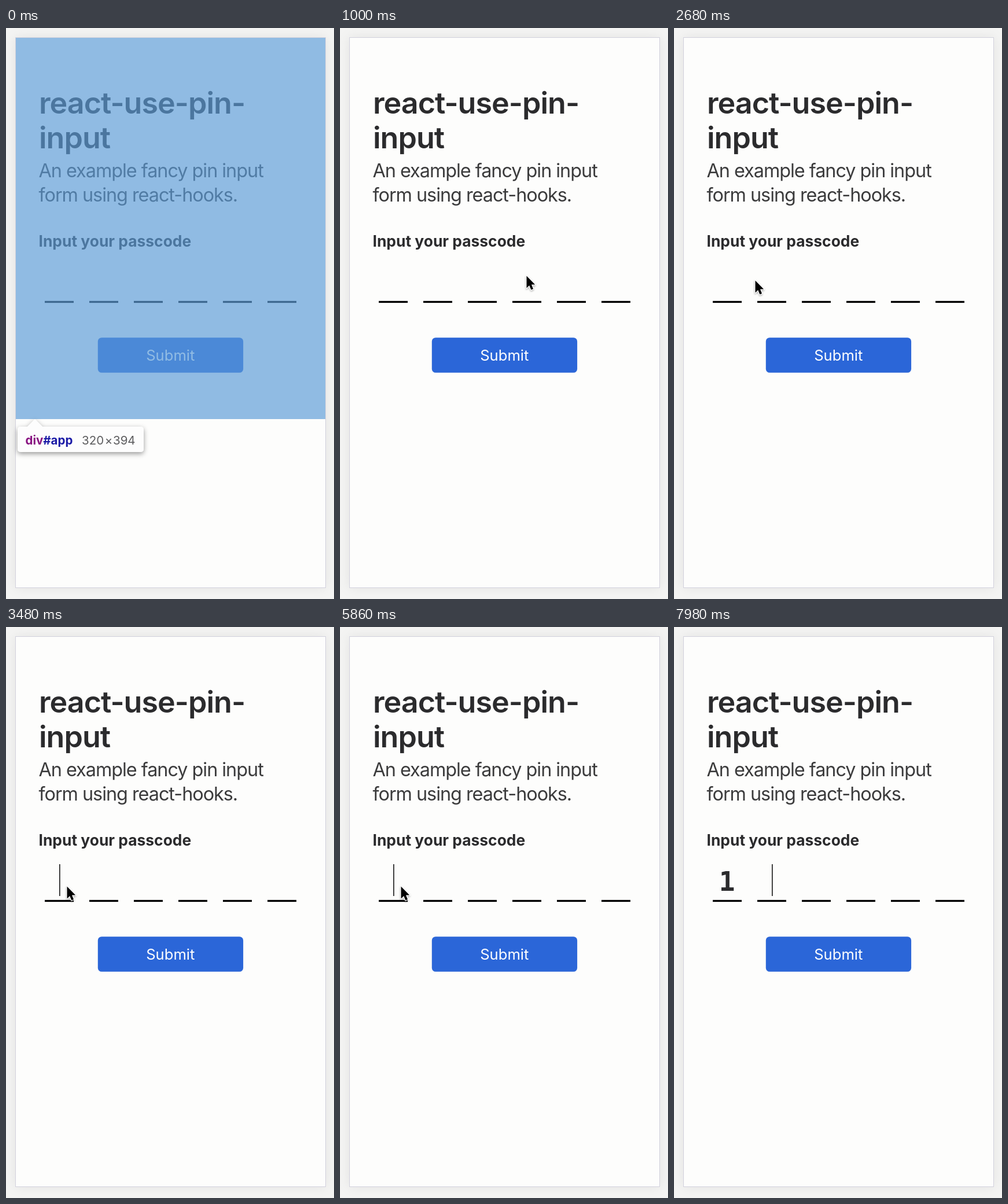
These frames come from a looping animation (567 by 987 pixels, 8000 ms). An HTML page:

```html
<!DOCTYPE html>
<html lang="en">
<head>
<meta charset="utf-8">
<title>Pin input</title>
<style>
  html, body { margin: 0; width: 100%; height: 100%; overflow: hidden; background: #f4f4f3; }
  svg { display: block; width: 567px; height: 987px; }
  text { font-family: Inter, "Open Sans", sans-serif; font-optical-sizing: none; fill: #2b2b2d; white-space: pre; }
  .title { font-size: 52px; font-weight: 600; letter-spacing: -0.019em; }
  .subtitle { font-size: 32.4px; letter-spacing: -0.032em; fill: #3b3b3c; }
  .label { font-size: 26.4px; font-weight: 700; }
  .button { font-size: 25.6px; fill: #fff; text-anchor: middle; }
  .digit { font: 700 46px "DejaVu Sans Mono", monospace; text-anchor: middle; }
  .tip { font-size: 20.5px; fill: #5c5c5e; }
  .tag { font-weight: 700; fill: #881280; }
  .id { fill: #1a1aa6; }
</style>
</head>
<body>
<svg viewBox="0 0 567 987">
  <defs>
    <filter id="pageShadow" x="-10%" y="-10%" width="120%" height="120%">
      <feDropShadow dx="0" dy="0" stdDeviation="10" flood-opacity=".07"/>
    </filter>
    <filter id="tipShadow" x="-20%" y="-50%" width="140%" height="200%">
      <feDropShadow dx="0" dy="3" stdDeviation="4" flood-opacity=".4"/>
    </filter>
    <filter id="pointerShadow" x="-50%" y="-50%" width="200%" height="200%">
      <feDropShadow dx="0" dy="1.5" stdDeviation="1.5" flood-opacity=".35"/>
    </filter>
  </defs>

  <rect x="16.5" y="16.5" width="536" height="951" fill="#fdfdfc" stroke="#d2d1dd" filter="url(#pageShadow)"/>
  <text class="title" x="57" y="147.5">react-use-pin-</text>
  <text class="title" x="57" y="207.5">input</text>
  <text class="subtitle" x="56.5" y="258">An example fancy pin input</text>
  <text class="subtitle" x="56.5" y="300">form using react-hooks.</text>
  <text class="label" x="56.5" y="378">Input your passcode</text>
  <g id="slots"></g>
  <rect x="158.8" y="535.2" width="251.3" height="60.6" rx="6.5" fill="#2b66d8"/>
  <text class="button" x="284.3" y="575">Submit</text>

  <text id="digit" class="digit" x="91.5" y="456">1</text>
  <rect id="caret" y="410" width="1.7" height="55" fill="#222"/>

  <g id="inspector">
    <rect x="17" y="17" width="535" height="659" fill="rgb(92,155,215)" fill-opacity=".67"/>
    <path filter="url(#tipShadow)" fill="#fdfdfd"
      d="M25 689H37L50 676 63 689H233a5 5 0 0 1 5 5V728a5 5 0 0 1-5 5H25a5 5 0 0 1-5-5V694a5 5 0 0 1 5-5Z"/>
    <text class="tip tag" x="33.5" y="720">div<tspan class="id">#app</tspan></text>
    <text class="tip" x="131" y="720">320</text>
    <text class="tip" x="177.5" y="720" text-anchor="middle">×</text>
    <text class="tip" x="185" y="720">394</text>
  </g>

  <g id="pointer" filter="url(#pointerShadow)">
    <path d="M.5 1.5V22.5L5.2 18 8.4 25.4 12 23.9 9 16.6H15.2Z"
      stroke="#fff" stroke-width="2.4" stroke-linejoin="round" paint-order="stroke"/>
  </g>
</svg>
<script>
  const LOOP = 8000, FOCUS = 3450, TYPED = 7700;
  const FIRST_SLOT = 92, SLOT_STEP = 77;

  // Pointer stops: time, x, y
  const stops = [
    [600, 590, 500], [1000, 322, 427], [1600, 322, 427],
    [2680, 140, 435], [3300, 105, 447]
  ];

  const el = id => document.getElementById(id);
  const show = (node, on) => node.setAttribute('visibility', on ? 'visible' : 'hidden');
  const ease = p => p * p * (3 - 2 * p);

  el('slots').innerHTML = Array.from({ length: 6 }, (_, i) =>
    `<rect x="${FIRST_SLOT - 25 + SLOT_STEP * i}" y="471.8" width="50" height="3.3"/>`).join('');

  function pointerAt(t) {
    const next = stops.findIndex(stop => stop[0] > t);
    if (next < 0) return stops[stops.length - 1].slice(1);
    if (next === 0) return stops[0].slice(1);
    const [t0, x0, y0] = stops[next - 1], [t1, x1, y1] = stops[next];
    const p = ease((t - t0) / (t1 - t0));
    return [x0 + (x1 - x0) * p, y0 + (y1 - y0) * p];
  }

  function render(t) {
    const typed = t >= TYPED;
    const blinkStart = typed ? TYPED : FOCUS;
    show(el('inspector'), t < 20);
    show(el('digit'), typed);
    show(el('caret'), t >= FOCUS && (t - blinkStart) % 1000 < 500);
    el('caret').setAttribute('x', FIRST_SLOT + (typed ? SLOT_STEP : 0));
    show(el('pointer'), t >= stops[0][0] && !typed);
    el('pointer').setAttribute('transform', `translate(${pointerAt(t)})`);
  }

  const start = performance.now();
  function frame() {
    render((performance.now() - start) % LOOP);
    requestAnimationFrame(frame);
  }
  render(0);
  requestAnimationFrame(frame);
</script>
</body>
</html>
```
